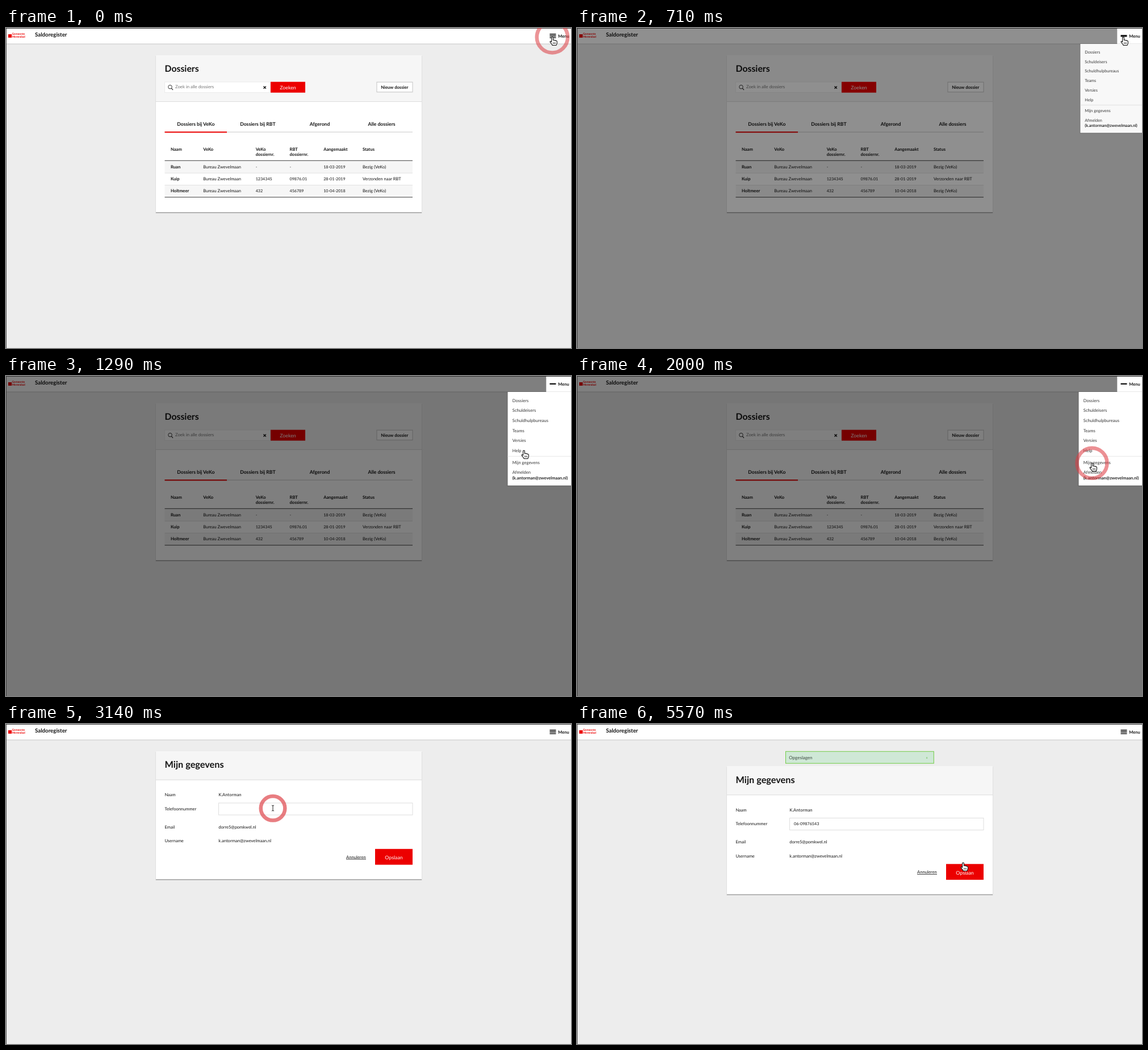
Animation of 995 by 563 pixels, one loop 6.14 s. Source, as an HTML page:

```html
<!DOCTYPE html>
<html lang="nl">
<head>
<meta charset="utf-8">
<title>Mijn gegevens</title>
<style>
  html, body { margin: 0; width: 100%; height: 100%; overflow: hidden; background: #ededed; }
  svg { display: block; width: 995px; height: 563px; }
  text { font-family: Lato, "Open Sans", sans-serif; text-rendering: geometricPrecision; white-space: pre; }
</style>
</head>
<body>
<svg id="stage" viewBox="0 0 995 563" xmlns="http://www.w3.org/2000/svg"></svg>
<script>
const STEPS = 43, LOOP = 6140;
const INK = '#151515', RED = '#ec0000';
const EMAIL = 'k.antorman@zwevelmaan.nl';
const PHONE = '06-09876543';

const rect = (x, y, w, h, fill, extra = '') =>
  `<rect x="${x}" y="${y}" width="${w}" height="${h}" fill="${fill}" ${extra}/>`;
const line = (x1, y1, x2, y2, color, w = 1) =>
  `<path d="M${x1} ${y1}L${x2} ${y2}" stroke="${color}" stroke-width="${w}" fill="none"/>`;
const text = (x, y, size, str, extra = '', fill = INK) =>
  `<text x="${x}" y="${y}" font-size="${size}" fill="${fill}" ${extra}>${str}</text>`;
const group = (body, extra = '') => `<g ${extra}>${body}</g>`;
const BOLD = 'font-weight="700"';
const MID = 'text-anchor="middle"';

function frame() {
  return rect(0, 0, 995, 28, '#fff') + line(0, 28, 995, 28, '#c6c6c6');
}

function branding() {
  return rect(4, 11, 6, 6, RED)
    + text(10.5, 11.6, 4.9, 'Gemeente', BOLD, RED)
    + text(10.5, 16.7, 4.9, 'Merendaal', BOLD, RED)
    + text(51, 15.2, 9.7, 'Saldoregister', BOLD);
}

function card(h, head) {
  return rect(263.5, 49, 469, h, '#000', 'opacity=".1"')
    + rect(264, 48.5, 468, h, '#000', 'opacity=".22"')
    + rect(264, 48, 468, h - 1, '#fff')
    + rect(264, 48, 468, head - 48, '#f6f6f6')
    + line(264, head, 732, head, '#dcdcdc');
}

function button(x, y, w, h, label, base, extra = '') {
  return rect(x, y, w, h, RED) + text(x + w / 2, base, 8.8, label, MID + ' ' + extra, '#fff');
}

function listPage() {
  let s = card(277, 129.5) + text(279.5, 77, 15.8, 'Dossiers', BOLD);
  s += rect(279.5, 95, 185.5, 18.5, '#fff', 'stroke="#ececec"');
  s += '<circle cx="289" cy="103.7" r="3.3" fill="none" stroke="#333" stroke-width="1"/>'
    + line(291.4, 106.2, 294, 109, '#333', 1.2);
  s += text(298, 106.4, 7.75, 'Zoek in alle dossiers', '', '#757575');
  s += line(453.5, 102.5, 457.8, 106.8, INK, 1.4) + line(457.8, 102.5, 453.5, 106.8, INK, 1.4);
  s += button(466, 94.7, 61, 19, 'Zoeken', 107.5);
  s += rect(653, 95.2, 63, 17.5, '#fff', 'stroke="#c4c4c4"')
    + text(684.3, 106.5, 7.65, 'Nieuw dossier', BOLD + MID.replace(/^/, ' '));

  s += line(279.5, 183.2, 716, 183.2, '#e0e0e0', 1.8) + line(279.5, 183.2, 389, 183.2, RED, 2);
  ['Dossiers bij VeKo', 'Dossiers bij RBT', 'Afgerond', 'Alle dossiers'].forEach((t, i) => {
    s += text(334.3 + i * 109.1, 171.5, 8.6, t, BOLD + ' ' + MID);
  });

  const cols = [290, 347.3, 439.7, 499.5, 559.2, 628];
  ['Naam', 'VeKo', 'VeKo', 'RBT', 'Aangemaakt', 'Status'].forEach((t, i) => {
    s += text(cols[i], 216.1, 7.6, t, BOLD);
  });
  s += text(cols[2], 225, 7.6, 'dossiernr.', BOLD) + text(cols[3], 225, 7.6, 'dossiernr.', BOLD);

  const rows = [
    ['Ruan', '-', '-', '18-03-2019', 'Bezig (VeKo)'],
    ['Kuip', '1234345', '09876.01', '28-01-2019', 'Verzonden naar RBT'],
    ['Holtmeer', '432', '456789', '10-04-2018', 'Bezig (VeKo)']
  ];
  rows.forEach(([name, a, b, date, status], i) => {
    const y = 234 + i * 21.2, base = y + 12.6;
    if (i % 2 === 0) s += rect(279.5, y, 436.5, 21.2, '#f6f6f6');
    if (i) s += line(279.5, y, 716, y, '#e2e2e2');
    s += text(cols[0], base, 7.65, name, BOLD) + text(cols[1], base, 7.5, 'Bureau Zwevelmaan');
    [a, b, date].forEach((t, j) => { s += text(cols[j + 2], base, 7.15, t); });
    s += text(cols[5], base, 7.55, status);
  });
  return s + line(279.5, 233.4, 716, 233.4, '#666', 1.2) + line(279.5, 297.7, 716, 297.7, '#666', 1.2);
}

function formLabels() {
  return text(279.5, 77, 16.3, 'Mijn gegevens', BOLD)
    + text(279.5, 127.2, 7.5, 'Naam') + text(374.3, 127.2, 7.6, 'K.Antorman')
    + text(279.5, 151.9, 7.5, 'Telefoonnummer')
    + text(279.5, 183.6, 7.5, 'Email') + text(374.3, 183.6, 7.5, 'dorre5@pomkwel.nl')
    + text(279.5, 208, 7.5, 'Username') + text(374.3, 208, 7.6, EMAIL)
    + text(599, 236.6, 7.65, 'Annuleren') + line(599, 238, 634, 238, INK, .8);
}

function formPage() {
  return card(226, 98.3)
    + '<rect id="field" fill="#fff"/>'
    + text(382, 151.9, 7.2, '', 'id="phone"')
    + '<path id="caret" stroke="#111" stroke-width=".9"/>'
    + group(formLabels() + button(650, 219.8, 66, 27.8, 'Opslaan', 238), 'id="loaded"')
    + group(line(596.5, 237.5, 633.5, 237.5, INK, .9)
      + button(650, 219.8, 66, 27.8, 'Opslaan', 237.7,
        `style="font-family:'Open Sans',sans-serif;font-size:8.2px"`), 'id="loading"');
}

function notice() {
  return rect(367.5, 48.3, 260.8, 20.9, '#cfe8d6', 'stroke="#71cc45"')
    + group(text(373.3, 61.6, 8, 'Opgeslagen', '', '#3c4a40')
      + text(616, 61, 5.5, 'x', MID, '#5dbb45'), 'id="noticeText"');
}

function dropdown() {
  const items = ['Dossiers', 'Schuldeisers', 'Schuldhulpbureaus', 'Teams', 'Versies', 'Help'];
  let s = rect(882.5, 27.5, 122, 166.5, '#000', 'opacity=".18"') + rect(883.5, 28, 121, 164.7, '#fff');
  items.forEach((t, i) => { s += text(891.8, 45.6 + i * 17.7, 7.6, t, '', '#333'); });
  return s + line(883.5, 141.3, 1004, 141.3, '#e6e6e6')
    + text(891.8, 154.6, 7.6, 'Mijn gegevens', '', '#333')
    + text(891.8, 172.3, 7.6, 'Afmelden', '', '#333')
    + text(891.8, 181.8, 7.5, `(${EMAIL})`, BOLD, '#222');
}

const HAND = '<path d="M-1.4 1.2C-1.4-.5 1.4-.5 1.4 1.2V5.5C1.9 4.6 3.6 4.8 3.8 6 4.5 5.2 6 5.6 6.2 6.6 7 6 8.4 6.4 8.4 7.8V10.5C8.4 12 7.3 12.8 7 14.5H.2C-.2 12.8-2.6 10.8-3.8 8.8-4.4 7.6-2.8 6.8-1.4 8.6Z" fill="#fff" stroke="#111" stroke-width="1.1" stroke-linejoin="round"/>'
  + [1.6, 3.5, 5.4].map(x => line(x, 9.2, x, 12.3, '#222', .8)).join('');
const ARROW = '<path d="M0 0V12L2.8 9.5 4.6 13.6 6.4 12.8 4.7 8.8H8.4Z" fill="#111" stroke="#fff" stroke-width=".9"/>';
const BEAM = '<path d="M-2-5Q0-5 0-3.5 0-5 2-5M0-3.5V3.5M-2 5Q0 5 0 3.5 0 5 2 5" fill="none" stroke="#222"/>';

document.getElementById('stage').innerHTML =
  rect(0, 0, 995, 563, '#ededed')
  + group(listPage(), 'id="list"')
  + group(formPage(), 'id="form"')
  + group(notice(), 'id="notice"')
  + frame() + group(branding(), 'id="brand"')
  + rect(48, 15, 140, 9.5, '#d6d6d6', 'id="hint"')
  + rect(0, 0, 995, 563, '#000', 'id="dim"')
  + rect(951.3, 1, 44, 27, '#fff', 'id="menuBack"')
  + '<path id="bars" fill="none" stroke="#111"/>'
  + text(972.2, 17.2, 7.5, 'Menu', BOLD + ' id="menuText"')
  + group(dropdown(), 'id="drop"')
  + line(0, .4, 995, .4, '#222', 1) + line(.4, 0, .4, 563, '#333', .9)
  + '<circle id="ring" fill="none" stroke="#dd3c42" stroke-width="6.5"/>'
  + group(group(HAND, 'id="hand"') + group(ARROW, 'id="arrow"') + group(BEAM, 'id="beam"'), 'id="cursor"');

const el = {};
document.querySelectorAll('[id]').forEach(n => { el[n.id] = n; });
const show = (name, on) => { el[name].style.display = on ? '' : 'none'; };
const set = (name, attrs) => { for (const a in attrs) el[name].setAttribute(a, attrs[a]); };
const within = (k, a, b) => k >= a && k <= b;

// Pointer stops: step, x, y
const route = [[0, 962, 16], [7, 962, 16], [9, 912, 131], [11, 907, 153], [19, 907, 153],
  [22, 470, 148], [32, 470, 148], [33, 590, 185], [34, 672, 248], [35, 680, 244], [STEPS, 680, 244]];
// Click rings: last step, last radius, number of steps
const clicks = [[0, 30.5, 1], [7, 30.5, 2], [15, 35, 3], [24, 35, 3], [38, 30.5, 2]];

function pointer(k) {
  const i = route.findIndex((p, j) => j && k <= p[0]);
  const [k0, x0, y0] = route[i - 1], [k1, x1, y1] = route[i];
  const f = (k - k0) / (k1 - k0);
  return [x0 + (x1 - x0) * f, y0 + (y1 - y0) * f];
}

function drawMenu(k) {
  const open = within(k, 3, 14);
  const n = Math.min(k - 3, 3);
  ['dim', 'menuBack', 'drop'].forEach(id => show(id, open));
  if (open) {
    const scale = [.62, .775, .95, 1][n];
    set('dim', { opacity: [.08, .29, .44, .5][n] });
    set('drop', {
      opacity: [.25, .72, .95, 1][n],
      transform: `translate(941 28) scale(${scale}) translate(-941 -28)`
    });
  }
  const gap = open ? [2.9, 2.3, .9, 0][n] : 3.05;
  const x = within(k, 15, 16) || k === 38 ? 954.3 : 957.5;
  set('bars', {
    d: [-gap, 0, gap].map(d => `M${x} ${13.9 + d}h11`).join(''),
    'stroke-width': gap ? 1.6 : 2.3
  });
  show('hint', k === 4);
}

function drawForm(k) {
  const saved = k >= 38, blank = within(k, 15, 16) || k === 38;
  show('list', k < 15);
  show('form', k >= 15);
  show('notice', saved);
  show('noticeText', !blank);
  show('brand', !blank);
  show('menuText', !blank);
  show('loaded', !blank);
  show('loading', blank);
  set('form', { transform: `translate(0 ${saved ? 26.5 : 0})` });

  const focus = within(k, 23, 36);
  set('field', focus
    ? { x: 374.4, y: 138.8, width: 341.6, height: 21.6, rx: .8, stroke: '#3465c9', 'stroke-width': 2 }
    : { x: 374.5, y: 139, width: 341.5, height: 21, rx: 0, stroke: '#dedede', 'stroke-width': 1 });
  const count = k < 25 ? 0 : Math.min(PHONE.length, Math.round(7 + 1.4 * (k - 29)));
  el.phone.textContent = blank ? '' : PHONE.slice(0, count);
  show('caret', focus);
  if (focus) {
    const x = 382.4 + (count ? el.phone.getComputedTextLength() : 0);
    set('caret', { d: `M${x} 145v9` });
  }
}

function drawPointer(k) {
  const [x, y] = pointer(k);
  set('cursor', { transform: `translate(${x} ${y})` });
  show('cursor', !within(k, 25, 32));
  const beam = within(k, 22, 24), arrow = within(k, 18, 21) || within(k, 33, 34);
  show('beam', beam);
  show('arrow', arrow);
  show('hand', !beam && !arrow);

  const click = clicks.find(([last, , n]) => within(k, last - n + 1, last));
  show('ring', click);
  if (click) {
    const r = click[1] - 5.2 * (click[0] - k);
    set('ring', { cx: x, cy: y + .3, r: r - 3.3, opacity: .56 - (r - 30) * .02 });
  }
}

const stepStart = k => Math.round(k * 100 / 7) * 10;
function update(ms) {
  const t = ms % LOOP;
  let k = Math.min(STEPS - 1, Math.floor(t * 7 / 1000) + 1);
  while (stepStart(k) > t) k--;
  drawMenu(k);
  drawForm(k);
  drawPointer(k);
}

const began = performance.now();
function tick() {
  update(Math.max(0, performance.now() - began));
  requestAnimationFrame(tick);
}
tick();
</script>
</body>
</html>
```
